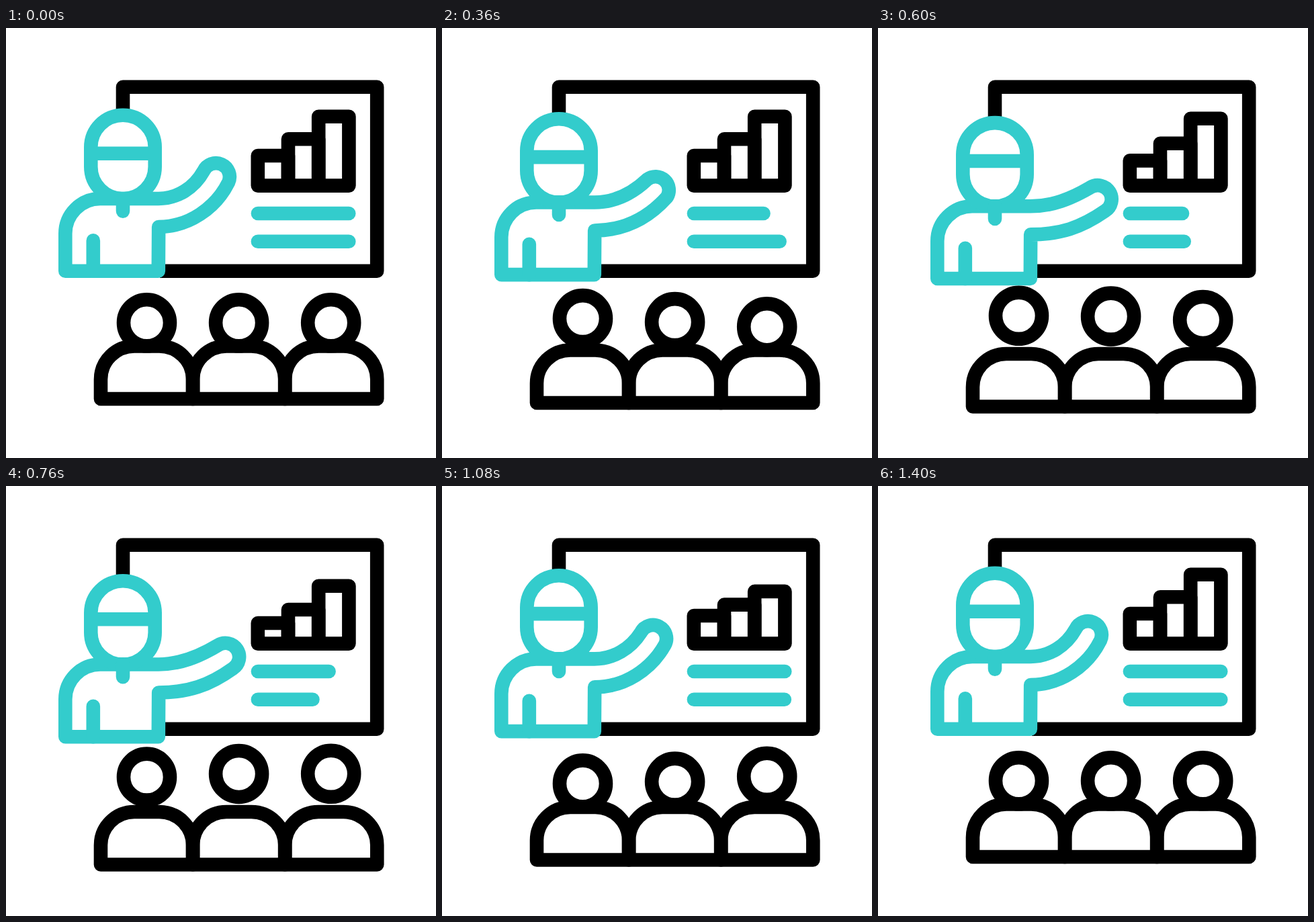
Recreate the animation shown at these times as an HTML page. Size 640x640 px, loop 1.56 s.

```html
<!DOCTYPE html>
<html lang="en">
<head>
<meta charset="utf-8">
<title>Presentation</title>
<style>
html, body { margin: 0; width: 100%; height: 100%; overflow: hidden; background: #fff; }
svg { display: block; width: 100vw; height: 100vh; }
g { fill: none; stroke-width: 20.6; stroke-linecap: round; stroke-linejoin: round; }
.ink { stroke: #000; }
.teal { stroke: #33cccc; }
</style>
</head>
<body>
<svg viewBox="0 0 640 640">
  <g class="ink">
    <path d="M174 135V87.8H552.2V361.7H229" stroke-linecap="butt"/>
    <path class="bar"/><path class="bar"/><path class="bar"/>
  </g>
  <g class="teal">
    <path class="line"/><path class="line"/>
    <g id="speaker">
      <path id="torso"/>
      <path d="M126.3 177.5a47.7 47.7 0 0 1 95.4 0V206.5a47.7 47.7 0 0 1 -95.4 0ZM126.3 186.7H221.7"/>
      <path d="M174 254V272.6M129.8 316.4V361.7"/>
    </g>
  </g>
  <g class="ink" id="crowd"></g>
</svg>
<script>
const LOOP = 1560, STEP = 40;
const all = s => [...document.querySelectorAll(s)];
const get = id => document.getElementById(id);

const ease = x => {
  x = Math.min(1, Math.max(0, x));
  return x * x * (3 - 2 * x);
};
// 0 -> 1 between a and b, then 1 -> 0 between c and d
const swing = (t, [a, b, c, d]) => ease((t - a) / (b - a)) - ease((t - c) / (d - c));

const bars = [
  { x: 374.8, top: 190, drop: 14, time: [450, 740, 767, 1214] },
  { x: 420, top: 165.2, drop: 20, time: [470, 810, 851, 1359] },
  { x: 465.2, top: 131.8, drop: 30, time: [510, 970, 970, 1400] }
];
const lines = [
  { y: 276, time: [160, 545, 545, 972] },
  { y: 317.8, time: [269, 675, 675, 1103] }
];
const heads = [
  [130, 560, 603, 1121],
  [180, 656, 739, 1187],
  [349, 735, 861, 1299]
];
const speakerTime = [100, 640, 760, 1260];
const armTime = [100, 600, 713, 1169];
const crowdTime = [110, 600, 770, 1310];

const barEls = all('.bar'), lineEls = all('.line');
const crowd = get('crowd'), speaker = get('speaker'), torso = get('torso');

crowd.innerHTML = heads.map((_, i) => {
  const x = 141 + 137.1 * i;
  return `<path d="M${x} 552V523a50 49.5 0 0 1 50 -49.5h37.1a50 49.5 0 0 1 50 49.5V552Z"/>` +
    `<circle cx="${x + 68.5}" cy="438.8" r="34.5"/>`;
}).join('');
const headEls = all('#crowd circle');

const shift = (el, y) => el.setAttribute('transform', `translate(0 ${y.toFixed(2)})`);

// arm up and arm lowered: upper curve, hand, lower curve
const armUp = [[255, 254], [280, 238], [294, 213], [331, 230], [312, 268], [272, 296]];
const armLow = [[259, 254], [287, 243], [316, 226], [338, 261], [302, 286], [271, 296]];

function torsoPath(k) {
  const p = armUp.map((a, i) => a.map((v, j) => (v + (armLow[i][j] - v) * k).toFixed(2)).join(' '));
  return `M88.3 361.7V306a52 52 0 0 1 52 -52H227C${p[0]} ${p[1]} ${p[2]}` +
    `A20 20 0 0 1 ${p[3]}C${p[4]} ${p[5]} 227.2 296L226.8 361.7Z`;
}

function draw(now) {
  const t = Math.floor((now % LOOP) / STEP) * STEP;
  bars.forEach((b, i) => {
    const top = b.top + b.drop * swing(t, b.time);
    barEls[i].setAttribute('d', `M${b.x} ${top}h45.2V234.6h-45.2Z`);
  });
  lines.forEach((l, i) => {
    lineEls[i].setAttribute('d', `M374.9 ${l.y}H${510.3 - 60 * swing(t, l.time)}`);
  });
  shift(speaker, 11.5 * swing(t, speakerTime));
  torso.setAttribute('d', torsoPath(swing(t, armTime)));
  shift(crowd, 11.5 * swing(t, crowdTime));
  heads.forEach((h, i) => shift(headEls[i], -22 * swing(t, h)));
}

function tick(now) {
  draw(now);
  requestAnimationFrame(tick);
}
draw(0);
requestAnimationFrame(tick);
</script>
</body>
</html>
```
